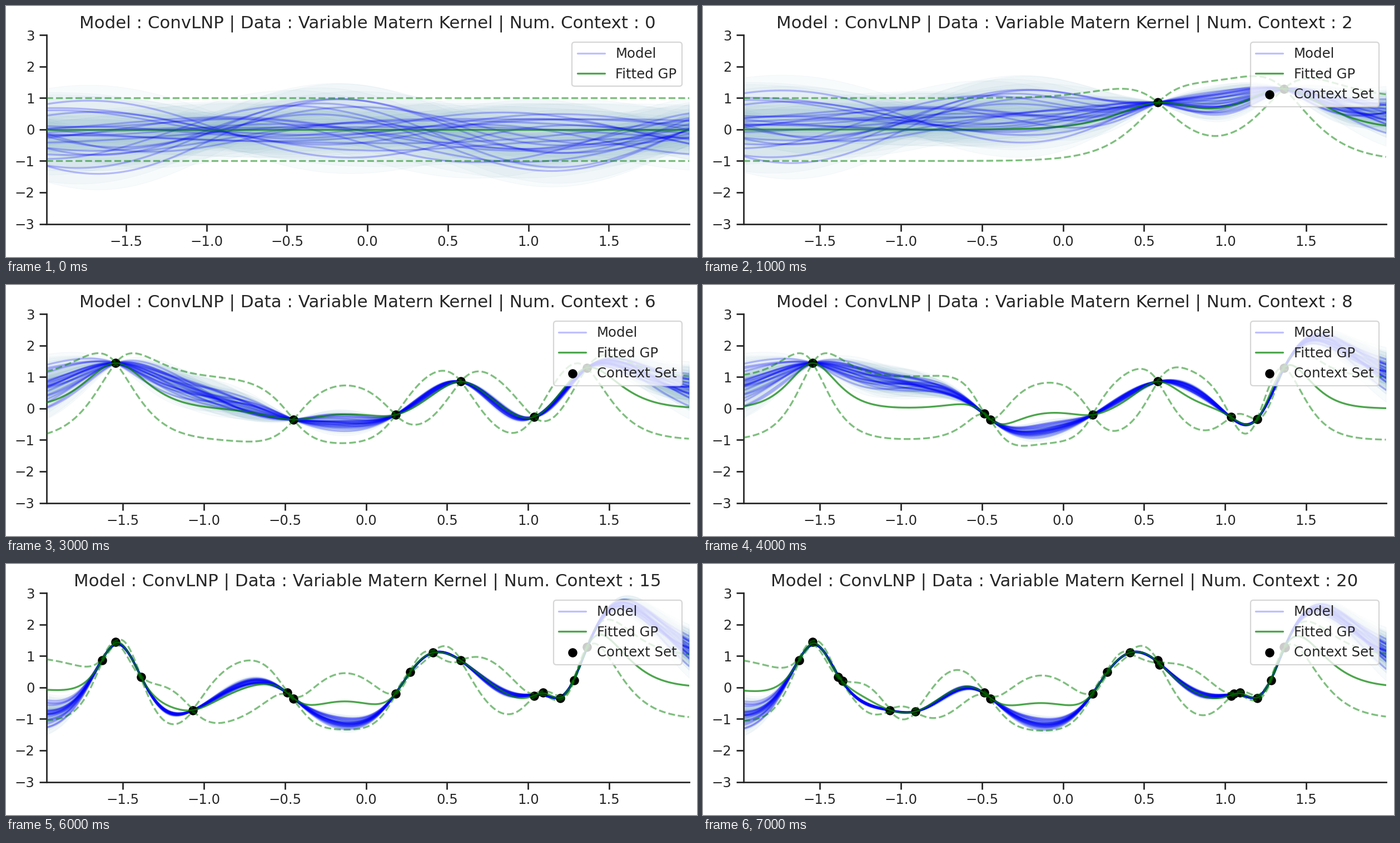
Write a matplotlib script that moves like this. It is 1243 px wide and 451 px high and loops after 8000 ms.

```python
import numpy as np
import matplotlib.pyplot as plt
from matplotlib.animation import FuncAnimation

W, H, DPI = 1243, 451, 100
INK = "#262626"


def px(v):
    """Pixels to points."""
    return v * 72 / DPI


plt.rcParams.update({
    "font.family": "DejaVu Sans", "font.size": px(24.4),
    "text.color": INK, "axes.edgecolor": INK,
    "axes.linewidth": px(2.75), "lines.linewidth": px(3.3),
    "lines.solid_capstyle": "round", "patch.linewidth": px(2.2),
})

# Observations in the order in which they are revealed.
CONTEXT = np.array([
    (0.585, 0.86), (1.362, 1.30), (-1.543, 1.45), (-0.446, -0.355),
    (0.182, -0.20), (1.035, -0.27), (-0.486, -0.16), (1.197, -0.34),
    (-1.388, 0.335), (1.282, 0.235), (-1.067, -0.72), (0.412, 1.11),
    (-1.625, 0.87), (1.092, -0.155), (0.273, 0.50), (-0.909, -0.766),
    (0.593, 0.73), (1.052, -0.20), (-1.358, 0.207), (1.368, 1.27),
])

# Number of revealed points and the length scale fitted to them.
STAGES = [(0, 0.28), (2, 0.283), (4, 0.288), (6, 0.21),
          (8, 0.163), (10, 0.175), (15, 0.20), (20, 0.21)]

CURVES = 22
rng = np.random.default_rng(4)
ARCH = np.linspace(-0.6, 1.0, CURVES)[:, None]
ARCH_PHASE = rng.normal(0, 0.35, (CURVES, 1))
TREND = rng.uniform(0.1, 0.6, (CURVES, 1))
TREND_PHASE = rng.uniform(0, 2 * np.pi, (CURVES, 1))


def model_draws(x):
    """Smooth random curves of the model before it sees any point."""
    arch = ARCH * np.cos(2.2 * (x + 0.35) + ARCH_PHASE)
    return arch + TREND * np.cos(1.1 * x + TREND_PHASE) - 0.08


def kernel(a, b, scale, floor):
    """Matern 5/2 covariance on top of a constant floor."""
    s = np.sqrt(5) * np.abs(a[:, None] - b) / scale
    return floor + (1 - floor) * (1 + s + s * s / 3) * np.exp(-s)


def fit(x, points, scale, noise, floor=0.0):
    """Posterior mean and standard deviation at x."""
    if not len(points):
        return np.zeros_like(x), np.ones_like(x)
    cx, cy = points.T
    kx = kernel(x, cx, scale, floor)
    gram = kernel(cx, cx, scale, floor) + noise * np.eye(len(cx))
    weights = np.linalg.solve(gram, kx.T).T
    var = 1 - (weights * kx).sum(axis=1)
    return weights @ cy, np.sqrt(np.clip(var, 0, None))


fig = plt.figure(figsize=(W / DPI, H / DPI), dpi=DPI, facecolor="white")
LEFT, RIGHT, TOP, BOTTOM = 72.5, 1228.5, 52.5, 391.5
ax = fig.add_axes([LEFT / W, 1 - BOTTOM / H,
                   (RIGHT - LEFT) / W, (BOTTOM - TOP) / H])


def style(count, lo, hi):
    ax.set_xlim(lo, hi)
    ax.set_ylim(-3, 3)
    ax.set_xticks(np.arange(-1.5, 1.6, 0.5))
    ax.set_yticks(range(-3, 4))
    ax.tick_params(length=px(13.2), width=px(2.75), pad=px(7.7),
                   color=INK, labelcolor=INK)
    ax.spines[["top", "right"]].set_visible(False)
    ax.set_title("Model : ConvLNP | Data : Variable Matern Kernel"
                 f" | Num. Context : {count}", fontsize=px(30.85), pad=px(13))
    ax.legend(loc="upper right")


def draw(i):
    count, scale = STAGES[i]
    points = CONTEXT[:count]
    lo, hi = (-1.971, 1.991) if count else (-1.996, 1.998)
    x = np.linspace(lo, hi, 400)
    centre, _ = fit(x, points, 0.38, 0.0015, floor=0.2)
    _, spread = fit(x, points, 0.6, 0.0005, floor=0.1)
    mean, std = fit(x, points, scale, 3e-4 * count)

    ax.clear()
    band = 0.5 * spread
    for n, y in enumerate(centre + spread * model_draws(x)):
        ax.fill_between(x, y - band, y + band, color="#5b9bb8", alpha=0.04,
                        lw=px(1.5), zorder=1)
        ax.plot(x, y, color="blue", alpha=0.25, zorder=2,
                label=None if n else "Model")
    ax.plot(x, mean, color="green", alpha=0.7, zorder=4, label="Fitted GP")
    for edge in (mean - std, mean + std):
        ax.plot(x, edge, "--", color="green", alpha=0.5, zorder=4)
    if count:
        ax.scatter(*points.T, s=px(13.2) ** 2, lw=px(3.3), color="black",
                   zorder=3, label="Context Set")
    style(count, lo, hi)
    return []


anim = FuncAnimation(fig, draw, frames=len(STAGES), interval=1000,
                     init_func=lambda: draw(0), repeat=True, repeat_delay=0)
plt.show()
```
